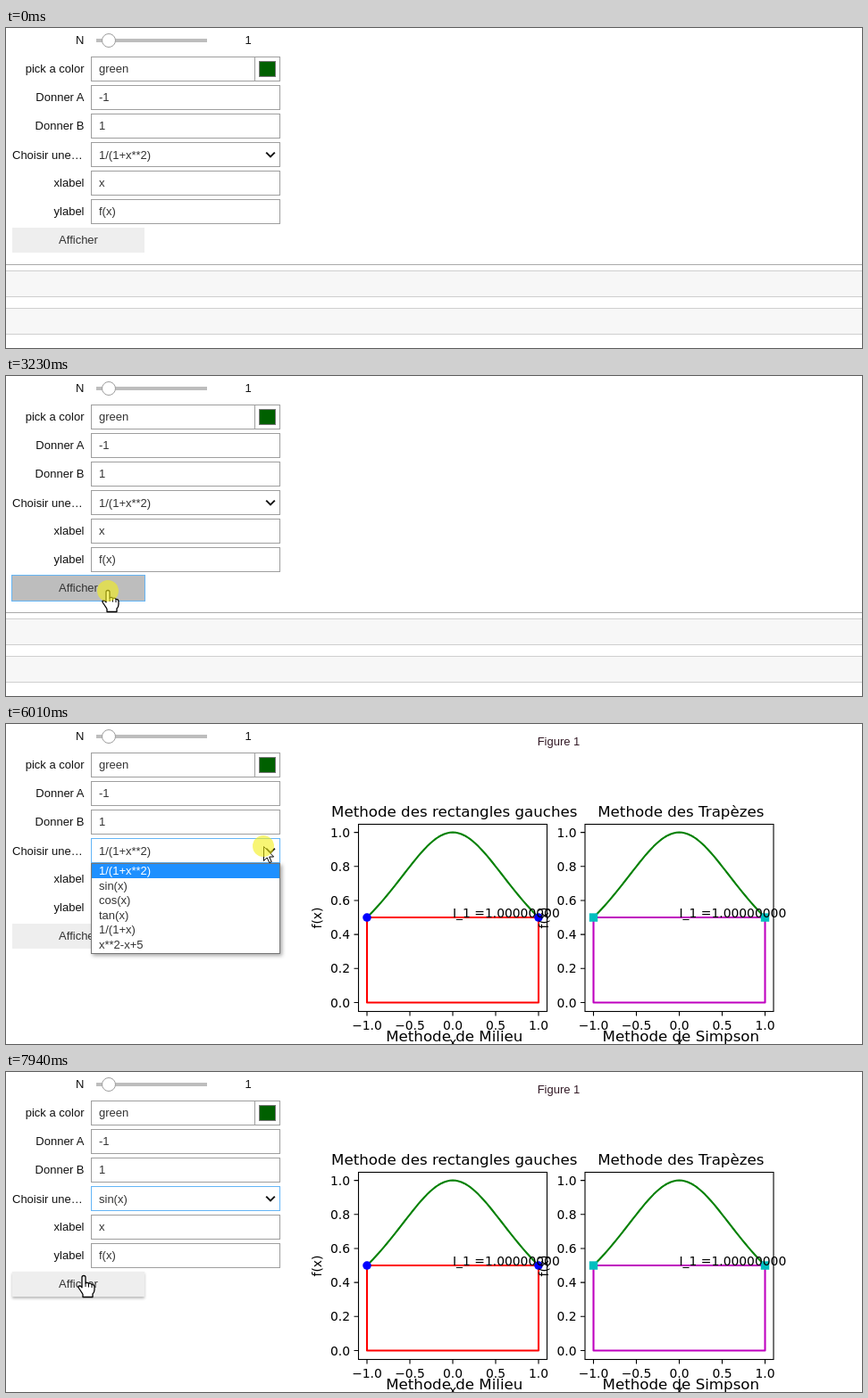
An HTML page for the animation above (8 s loop, 958 by 359 pixels).

```html
<!DOCTYPE html>
<html lang="fr">
<head>
<meta charset="utf-8">
<title>Méthodes d'intégration</title>
<style>
  html, body { margin: 0; width: 100%; height: 100%; overflow: hidden; background: #fff; }
  svg { display: block; width: 100%; height: 100%; }
  text { white-space: pre; }
  .ui { font: 13px "Liberation Sans", Arial, sans-serif; fill: #111; }
  .value { fill: #333; }
  .tick { font: 13.89px "DejaVu Sans", sans-serif; }
  .title { font: 16.67px "DejaVu Sans", sans-serif; }
  .box { fill: #fff; stroke: #9e9e9e; }
  .raised { filter: drop-shadow(0 2px 1.5px rgba(0,0,0,.28)); }
  #list .frame { filter: drop-shadow(2px 2px 2px rgba(0,0,0,.35)); }
</style>
</head>
<body>
<svg id="stage" viewBox="0 0 958 359"></svg>
<script>
const LOOP = 8000;
const OPTIONS = ['1/(1+x**2)', 'sin(x)', 'cos(x)', 'tan(x)', '1/(1+x)', 'x**2-x+5'];
const SELECT_Y = 142, NUMBER_ROWS = [78, 110], TEXT_ROWS = [46, 78, 110, 174, 206];
const ITEM_H = 16.5, LIST_TOP = 157.5;

// Pointer moves: start, end, number of steps, then [time, x, y] along the way.
const MOVES = [
  [330, 540, 4, [[330, 495, 294], [400, 350, 200], [470, 150, 95], [540, 52, 48]]],
  [800, 1580, 12, [[800, 46, 44], [950, 26, 25], [1090, 60, 3], [1296, 99, 8], [1440, 118, 14], [1580, 124, 42]]],
  [1650, 2410, 11, [[1650, 127, 50], [1870, 150, 80], [2090, 188, 114], [2410, 174, 182]]],
  [2560, 2830, 4, [[2560, 168, 190], [2650, 150, 212], [2740, 126, 233], [2830, 114, 241]]],
  [4900, 5680, 12, [[4900, 118, 235], [5110, 190, 172], [5325, 262, 112], [5680, 288, 137]]],
  [6010, 6690, 9, [[6010, 288, 137], [6095, 285, 141], [6265, 240, 166], [6435, 181, 174], [6690, 147, 181]]],
  [7180, 7940, 11, [[7180, 145, 183], [7600, 112, 212], [7940, 87, 229]]]
];
const CLICKS = [[3160, 3430], [6010, 6180], [6960, 7180]];

const text = (x, y, s, cls, anchor = 'start', extra = '') =>
  `<text x="${x}" y="${y}" class="${cls}" text-anchor="${anchor}" ${extra}>${s}</text>`;
const rect = (x, y, w, h, attrs) => `<rect x="${x}" y="${y}" width="${w}" height="${h}" ${attrs}/>`;
const path = (d, attrs) => `<path d="${d}" ${attrs}/>`;
const group = (id, body, attrs = '') => `<g id="${id}" ${attrs}>${body}</g>`;
const label = (y, s) => text(87.5, y + 4, s, 'ui', 'end');
const field = (y, name, value, id = '') =>
  label(y, name) + rect(95.5, y - 13.5, 211, 27, `class="box" ${id && `id="${id}"`}`) +
  (value ? text(104, y + 4, value, 'ui value') : '');

function form() {
  const spinner = (y, i) => group('spin' + i,
    rect(291, y - 12, 15, 24, 'fill="#f0f0f0"') +
    path(`M294.5 ${y - 4}h7l-3.5 -4zM294.5 ${y + 5}h7l-3.5 4z`, 'fill="#505050"'));
  return label(14, 'N') + rect(101, 12, 124, 4, 'fill="#bdbdbd"') +
    '<circle cx="115" cy="14" r="7.5" fill="#fff" stroke="#9e9e9e"/>' +
    text(271, 18, '1', 'ui', 'middle') +
    field(46, 'pick a color', 'green') +
    path('M278.5 32.5v27', 'stroke="#9e9e9e"') +
    rect(283.5, 37.5, 18, 17, 'fill="#006000" stroke="#777"') +
    field(78, 'Donner A', '-1') + field(110, 'Donner B', '1') +
    NUMBER_ROWS.map(spinner).join('') +
    text(7, SELECT_Y + 4.5, 'Choisir une…', 'ui') + field(SELECT_Y, '', '', 'select') +
    text(104, SELECT_Y + 4.5, '', 'ui value', 'start', 'id="choice"') +
    path('M291.2 139.6l4.8 4.8l4.8 -4.8', 'fill="none" stroke="#111" stroke-width="2"') +
    field(174, 'xlabel', 'x') + field(206, 'ylabel', 'f(x)') +
    rect(7, 224, 148, 28, 'id="button"') +
    rect(6.5, 223.5, 149, 29, 'id="focus" fill="none" stroke="#64b5f6"') +
    text(81, 242, 'Afficher', 'ui value', 'middle');
}

function emptyOutput() {
  const bar = y => rect(-2, y + .5, 962, 29, 'fill="#f7f7f7" stroke="#cfcfcf"');
  return group('bars', path('M0 265.5h958', 'stroke="#aaa"') + bar(272) + bar(314));
}

function plot(cx, title, nextTitle, color, marker) {
  const X = v => cx + 96 * v, Y = v => 312.5 - 190.9 * v;
  const left = cx - 105.5, bottom = 322.5;
  let ticks = '', labels = '';
  for (let i = 0; i <= 5; i++) {
    const y = Y(i / 5);
    ticks += `M${left} ${y}h-5`;
    labels += text(left - 9.5, y + 5, (i / 5).toFixed(1), 'tick', 'end');
  }
  for (let v = -1; v <= 1; v += .5) {
    ticks += `M${X(v)} ${bottom}v5`;
    labels += text(X(v), 343, v.toFixed(1).replace('-', '−'), 'tick', 'middle');
  }
  const curve = Array.from({ length: 61 }, (_, i) => {
    const v = i / 30 - 1;
    return `${X(v)} ${Y(1 / (1 + v * v))}`;
  }).join('L');
  const line = 'fill="none" stroke-width="2.08" stroke-linejoin="round" stroke=';
  return text(cx + 1.8, 104, title, 'title', 'middle') +
    path('M' + curve, line + '"#008000"') +
    rect(X(-1), Y(.5), 192, Y(0) - Y(.5), `${line}"${color}"`) +
    [-1, 1].map(v => marker(X(v), Y(.5))).join('') +
    path(ticks, 'stroke="#000" stroke-width="1.1"') +
    rect(left, 112.5, 211, 210, 'fill="none" stroke="#000" stroke-width="1.1"') +
    labels + text(cx, 362, 'x', 'tick', 'middle') +
    text(0, 0, 'f(x)', 'tick', 'middle', `transform="translate(${cx - 146.8} 217.5) rotate(-90)"`) +
    text(cx, 217, 'I_1 =1.00000000', 'tick') +
    text(cx + 1.8, 356, nextTitle, 'title', 'middle');
}

function list() {
  return group('list',
    rect(95.5, 156.5, 211, 101, 'class="frame" fill="#fff" stroke="#767676"') +
    rect(96, 0, 210, 16, 'id="mark" fill="#1e90ff"') +
    OPTIONS.map((s, i) => text(104, 169 + ITEM_H * i, s, 'ui value option')).join(''));
}

function pointers() {
  const ink = 'fill="#fff" stroke="#000" stroke-linejoin="round"';
  return group('pointer',
    group('arrow', path('M.5 .5V16.5L4.2 13L6.8 18.6L9.2 17.6L6.7 12H11.6Z', ink)) +
    group('hand', path('M-2 1.5q0 -2 2 -2t2 2V8q2.5 -1.5 3.5 .5q2.5 -1 3.5 1q2.5 -.5 3 2V15q0 3 -2 5V23.5H-1V20.5' +
      'q-1 -2 -4.5 -7q-1.5 -2.5 1 -2.7q1.5 0 2.5 2Z', ink + ' stroke-width="1.3"') +
      path('M2 8v4M5.5 9v3.5M9 10v3', 'stroke="#000"')) +
    group('beam', path('M-3 -7.5h2.5l1 1l1 -1h2.5M-3 7.5h2.5l1 -1l1 1h2.5M.5 -7v14', 'fill="none" stroke="#000"')) +
    '<circle id="click" r="12" fill="rgb(244,239,24)" opacity=".6"/>');
}

const dot = (x, y) => `<circle cx="${x}" cy="${y}" r="4.8" fill="#0000ff"/>`;
const square = (x, y) => rect(x - 4.7, y - 4.7, 9.4, 9.4, 'fill="#00bfbf"');

document.getElementById('stage').innerHTML = form() + emptyOutput() +
  group('heading', text(618.5, 24, 'Figure 1', 'ui', 'middle', 'style="fill:#331a26"')) +
  group('plots',
    plot(500, 'Methode des rectangles gauches', 'Methode de Milieu', '#ff0000', dot) +
    plot(753.5, 'Methode des Trapèzes', 'Methode de Simpson', '#bf00bf', square)) +
  list() + pointers();

const $ = id => document.getElementById(id);
const show = (id, on) => { $(id).style.display = on ? '' : 'none'; };
const optionTexts = document.querySelectorAll('.option');

function pointerAt(t) {
  const move = MOVES.filter(m => m[0] <= t).pop();
  if (!move) return null;
  const [start, end, steps, keys] = move;
  const dt = (end - start) / (steps - 1);
  const time = Math.min(end, start + Math.floor((t - start) / dt + .3) * dt);
  const next = keys.findIndex(k => k[0] >= time - .01);
  const b = keys[next], a = keys[Math.max(0, next - 1)];
  const u = a === b ? 0 : (time - a[0]) / (b[0] - a[0]);
  return [a[1] + (b[1] - a[1]) * u, a[2] + (b[2] - a[2]) * u];
}

function draw(t) {
  const pos = pointerAt(t), [x, y] = pos || [-99, -99];
  const open = t >= 6010 && t < 7180;
  const onRow = row => !open && x > 95 && x < 307 && Math.abs(y - row) < 14;
  const onButton = !open && x > 7 && x < 155 && y > 224 && y < 252;
  const onText = TEXT_ROWS.some(onRow) && !(y < 60 && x > 278);
  const pressed = t >= 3160 && t < 3430;
  const focused = t >= 3160 && t < 6010;

  show('pointer', pos);
  $('pointer').setAttribute('transform', `translate(${x} ${y})`);
  show('hand', onButton);
  show('beam', onText);
  show('arrow', !onButton && !onText);
  show('click', CLICKS.some(([from, to]) => t >= from && t < to));
  NUMBER_ROWS.forEach((row, i) => show('spin' + i, onRow(row)));

  $('button').setAttribute('fill', pressed ? '#bdbdbd' : '#eee');
  $('button').setAttribute('class', onButton && !focused ? 'raised' : '');
  show('focus', focused);
  $('select').style.stroke = t >= 6010 ? '#64b5f6' : '';
  $('choice').textContent = OPTIONS[t >= 7180 ? 1 : 0];

  show('list', open);
  const hot = Math.max(0, Math.floor((y - LIST_TOP) / ITEM_H));
  $('mark').setAttribute('y', Math.round(157 + ITEM_H * hot));
  optionTexts.forEach((el, i) => { el.style.fill = i === hot ? '#fff' : ''; });

  show('bars', t < 3890);
  show('heading', t >= 3890);
  show('plots', t >= 4090);
}

function tick() {
  draw(performance.now() % LOOP);
  requestAnimationFrame(tick);
}
tick();
</script>
</body>
</html>
```
